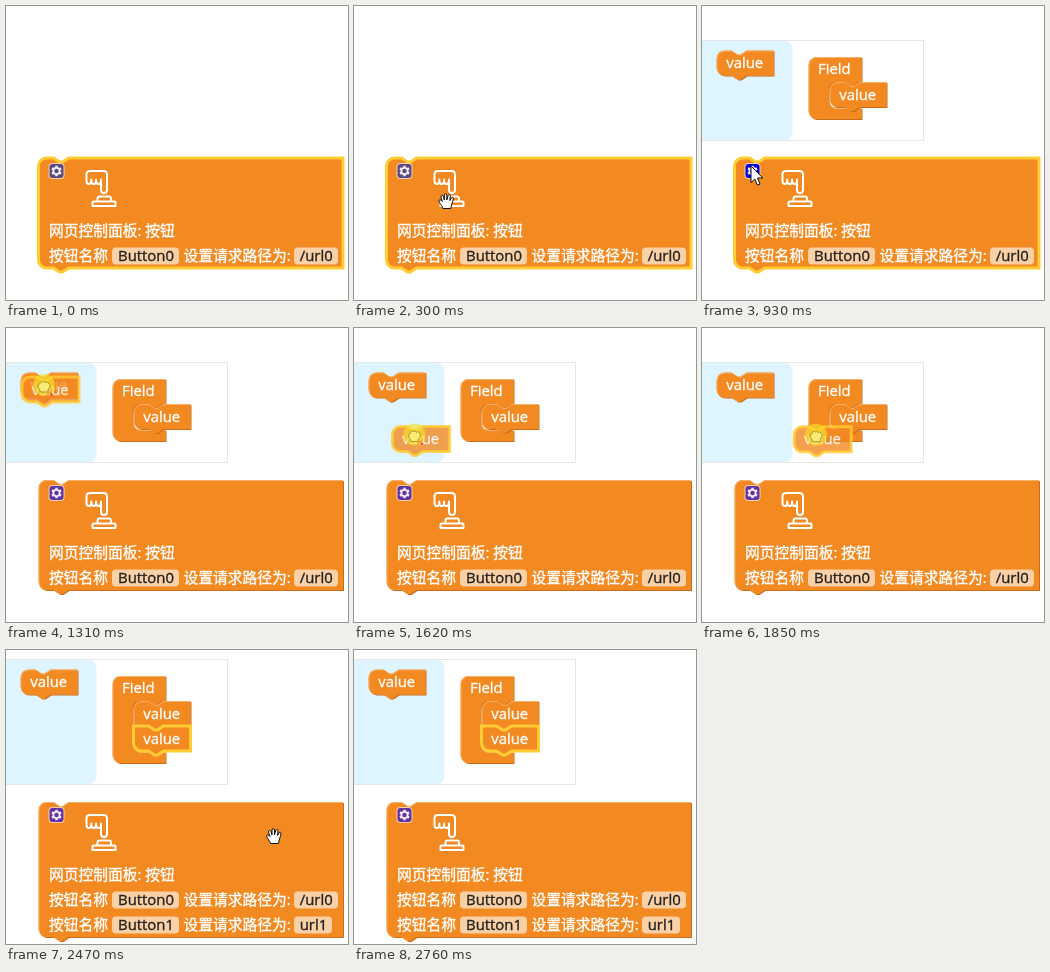
An HTML page with a canvas for the animation above (3160 ms loop, 342x294 px).

```html
<!DOCTYPE html>
<html lang="zh">
<head>
<meta charset="utf-8">
<style>
  html, body { margin: 0; width: 100%; height: 100%; overflow: hidden; background: #fff; }
  canvas { display: block; width: 342px; height: 294px; }
</style>
</head>
<body>
<canvas id="stage" width="342" height="294"></canvas>
<script>
const ctx = document.getElementById('stage').getContext('2d');
const LOOP = 3160, TICK = 77.1;
const ORANGE = '#f38921', LIGHT = '#f8b068', DARK = '#c86d1b', YELLOW = '#fc3';
const FONT = '"Open Sans", "Noto Sans", "Noto Sans CJK SC", "Noto Sans CJK", sans-serif';

const HOVER = 8, OPEN = 10, PRESS = 15, DRAG = 17, DROP = 27, UPDATE = 29, LEAVE = 36;

// Pointer way-points: tick, x, y
const POINTER = [
  [1, 183, 255], [3, 120, 212], [6, 37, 161], [7, 37, 161], [8, 47, 163], [9, 49, 160],
  [12, 49, 160], [14, 36, 56], [15, 36, 54], [17, 38, 58], [21, 60.5, 107.5],
  [26, 150, 108], [29, 150, 108], [30, 150, 95], [32, 268, 186], [35, 325, 284]
];

const ARROW = new Path2D('M0,0V16.5L3.8,13 6.4,19 9,18 6.5,12H11.8Z');
const HAND = new Path2D('M-3.5,7.5C-4,5-7,2-7.5,0C-7.5,-1.5-5.5,-1.5-4,.5L-5.5,-4' +
  'C-5.5,-6-3.5,-6-3,-4.5L-2,-1V-6C-2,-7.8.3,-7.8.5,-6V-1L1.7,-5.5C2.3,-7.2 4.2,-6.5 4,-5' +
  'L3.5,-.5 5,-3C6,-4.5 7.5,-3.5 7,-2C6,2 5,4 4.5,7.5Z');
const FIST = new Path2D('M-3.5,6C-4,4-6,2-6,0C-6,-2-4,-2-4,-2C-4,-5-1.5,-5-1,-3.5' +
  'C-.5,-5 1.5,-5 2,-3C3,-4.5 4.5,-4 4.5,-2.5C6.5,-2.5 6,1 4.5,3V6Z');
const PRESS_ICON = new Path2D('M80.5,175V168Q80.5,165 84,165H97.5Q101,165 101,168.5V184' +
  'Q101,187 98,187Q95,187 95,184V173.5M80.5,175Q80.5,178 82.9,178Q85.3,178 85.3,175' +
  'V173.5V175Q85.3,178 87.7,178Q90.1,178 90.1,175V173.5V175Q90.1,178 92.5,178Q95,178 95,175' +
  'M91.5,195V192.5Q91.5,190.5 93.5,190.5H103Q105,190.5 105,192.5V195' +
  'M88,195.5H108.5Q109.5,195.5 109.5,196.5V200H86.5V196.5Q86.5,195.5 88,195.5');

function fillStroke(path, fill, stroke, width) {
  ctx.fillStyle = fill;
  ctx.fill(path);
  ctx.strokeStyle = stroke;
  ctx.lineWidth = width;
  ctx.stroke(path);
}

// A hairline around the glyphs gives them the weight of hinted screen text
function label(text, x, y, size = 14.9, color = '#fff') {
  ctx.font = `${size}px ${FONT}`;
  ctx.fillStyle = ctx.strokeStyle = color;
  ctx.lineWidth = .35;
  ctx.fillText(text, x, y);
  ctx.strokeText(text, x, y);
}

function box(x, y, w, h, radii, color) {
  ctx.beginPath();
  ctx.roundRect(x, y, w, h, radii);
  ctx.fillStyle = color;
  ctx.fill();
}

// Corners on the left are square where a neighbour is attached
function stackPath(x, y, w, h, above, below) {
  const start = above ? `M${x},${y}h15` : `M${x},${y + 8}a8,8 0 0,1 8,-8h7`;
  const end = below ? `H${x}Z` : `H${x + 8}a8,8 0 0,1 -8,-8Z`;
  return new Path2D(`${start}l6,4h3l6,-4H${x + w}v${h}H${x + 30}l-6,4h-3l-6,-4${end}`);
}

function fieldPath(x, y, count) {
  return new Path2D(`M${x},${y + 8}a8,8 0 0,1 8,-8h45v25h-3l-6,4h-3l-6,-4h-7` +
    `a8,8 0 0,0 -8,8v${count * 25 - 15}a8,8 0 0,0 8,8h25v11h-45a8,8 0 0,1 -8,-8Z`);
}

function drawBlock(path, selected) {
  if (selected) return fillStroke(path, ORANGE, YELLOW, 3);
  ctx.save();
  ctx.translate(1, 1);
  ctx.fillStyle = DARK;
  ctx.fill(path);
  ctx.translate(-1, -1);
  ctx.fillStyle = ORANGE;
  ctx.fill(path);
  // The clip keeps only the top and left part of the shifted highlight
  ctx.clip(path);
  ctx.translate(.5, .5);
  ctx.strokeStyle = LIGHT;
  ctx.lineWidth = 1;
  ctx.stroke(path);
  ctx.restore();
}

function valueBlock(x, y, { selected, above, below } = {}) {
  drawBlock(stackPath(x, y, 57, 25, above, below), selected);
  label('value', x + 9.7, y + 17.5);
}

function gear(color) {
  ctx.save();
  ctx.translate(50.5, 165);
  box(-8, -8, 16, 16, 4, '#f7cfae');
  box(-7, -7, 14, 14, 3, color);
  ctx.strokeStyle = ctx.fillStyle = '#f4ecf4';
  ctx.lineWidth = 1.8;
  ctx.beginPath();
  ctx.arc(0, 0, 3.1, 0, 7);
  ctx.stroke();
  for (let i = 0; i < 6; i++) {
    ctx.rotate(Math.PI / 3);
    ctx.fillRect(-1.2, -5.2, 2.4, 2);
  }
  ctx.restore();
}

function settingRow(y, name, url, urlWidth) {
  label('按钮名称', 43, y + 5, 14.75);
  label('设置请求路径为:', 177.5, y + 5, 14.75);
  box(106, y - 8.5, 67, 17, 4, '#fad0a6');
  box(288, y - 8.5, urlWidth, 17, 4, '#fad0a6');
  label(name, 112, y + 5, 14.9, '#222');
  label(url, 293.7, y + 5, 14.9, '#222');
}

function mainBlock(tick) {
  const grown = tick >= UPDATE;
  drawBlock(stackPath(32.5, 152, 304.5, grown ? 135 : 110), tick < DRAG);
  gear(tick < HOVER ? '#5b4a80' : tick < 13 ? '#00d' : '#6133a2');
  ctx.strokeStyle = '#fff';
  ctx.lineWidth = 2;
  ctx.lineJoin = ctx.lineCap = 'round';
  ctx.stroke(PRESS_ICON);
  ctx.lineJoin = 'miter';
  ctx.lineCap = 'butt';
  label('网页控制面板: 按钮', 43, 230, 14.75);
  settingRow(250, 'Button0', '/url0', 44);
  if (grown) settingRow(275, 'Button1', 'url1', 38);
}

function mutator(tick) {
  const top = tick >= UPDATE ? 9 : 34, dropped = tick >= DROP;
  ctx.save();
  ctx.beginPath();
  ctx.rect(0, top, 222, 135 - top);
  ctx.clip();
  ctx.fillStyle = '#fff';
  ctx.fillRect(0, top, 222, 135 - top);
  box(0, top + 1, 90.5, 133 - top, [0, 8, 8, 0], '#def4ff');
  valueBlock(14.5, top + 10.5, { selected: tick >= PRESS && tick < DRAG });
  drawBlock(fieldPath(106.5, top + 17, dropped ? 2 : 1));
  label('Field', 116, top + 34);
  valueBlock(127.5, top + 42, { below: dropped });
  if (dropped) valueBlock(127.5, top + 67, { selected: true, above: true });
  ctx.strokeStyle = '#e6e6e6';
  ctx.lineWidth = 1;
  ctx.strokeRect(-1.5, top + .5, 223, 134 - top);
  ctx.restore();
}

function pointerAt(tick) {
  const next = Math.max(1, POINTER.findIndex(p => p[0] >= tick));
  const [t0, x0, y0] = POINTER[next - 1], [t1, x1, y1] = POINTER[next];
  const k = (tick - t0) / (t1 - t0);
  return [x0 + (x1 - x0) * k, y0 + (y1 - y0) * k];
}

function drawPointer(tick, x, y) {
  const pressed = tick >= PRESS && tick < DROP;
  const arrow = tick >= HOVER && tick < 14 || tick >= DROP && tick < 30;
  ctx.save();
  ctx.translate(x, y);
  fillStroke(arrow ? ARROW : pressed ? FIST : HAND, '#fff', '#111', 1);
  if (pressed && tick >= DRAG && x < 90) {
    ctx.strokeStyle = '#e33';
    ctx.lineWidth = 1.5;
    ctx.stroke(new Path2D('M3,4l5,5m0,-5l-5,5'));
  }
  // The click marker lies over the pointer
  if (pressed) {
    ctx.globalAlpha = .65;
    box(-11, -12, 22, 22, 11, '#f8e02c');
  }
  ctx.restore();
}

function render(now) {
  const tick = Math.floor((now % LOOP + 17) / TICK);
  ctx.fillStyle = '#fff';
  ctx.fillRect(0, 0, 342, 294);
  mainBlock(tick);
  if (tick >= OPEN) mutator(tick);
  if (tick >= 1 && tick < LEAVE) {
    const [x, y] = pointerAt(tick);
    if (tick >= DRAG && tick < DROP) {
      ctx.globalAlpha = .8;
      valueBlock(x - 22, y - 9, { selected: true });
      ctx.globalAlpha = 1;
    }
    drawPointer(tick, x, y);
  }
}

const start = performance.now();
function loop() {
  render(performance.now() - start);
  requestAnimationFrame(loop);
}
loop();
</script>
</body>
</html>
```
